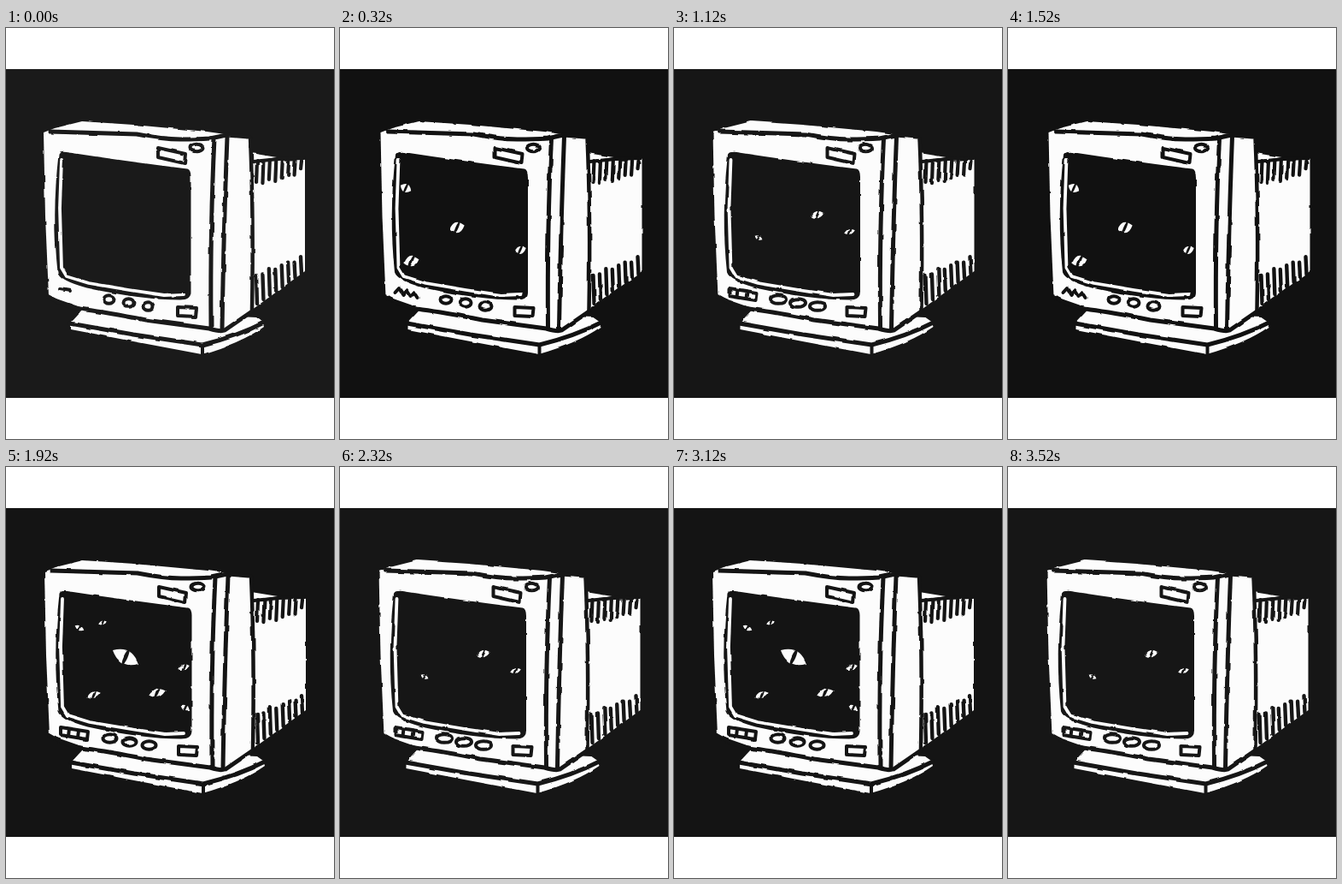
An HTML page that plays this animation: 384 by 480 pixels, repeating every 3560 ms.

```html
<!DOCTYPE html>
<html lang="en">
<head>
<meta charset="utf-8">
<title>Watching monitor</title>
<style>
  html, body { margin: 0; width: 100%; height: 100%; overflow: hidden; background: #fff; }
  svg { display: block; width: 384px; height: 480px; }
</style>
</head>
<body>
<svg id="stage" viewBox="0 0 384 480" stroke-linecap="round" stroke-linejoin="round"></svg>
<script>
const LOOP = 3560, STEP = 100, CYCLE = 12, HOLD = 4, LAG = 10;
const PAPER = '#fcfcfc';
const stage = document.getElementById('stage');

// Eyes are x, y, half length; a negative length tilts the eye the other way.
const drawings = [
  { ink: '#1a1a1a', shift: -1, knob: 6, badge: dash, roundness: 0, eyes: [] },
  { ink: '#111', shift: 2.5, knob: 6.5, badge: zigzag, roundness: .7,
    eyes: [[77, 187, -7], [137, 233, 9], [211, 259, 7], [84, 272, 9]] },
  { ink: '#141414', shift: 0, knob: 8, badge: grid, roundness: .46,
    eyes: [[86, 188, -6], [113, 182, 5], [140, 222, -17], [208, 234, 7],
           [103, 266, 8], [177, 264, 10], [210, 282, -6]] },
  { ink: '#161616', shift: .5, knob: 9, badge: grid, roundness: .5,
    eyes: [[99, 245, -5], [168, 218, 8], [206, 238, 6]] }
];

let ink;
const mix = (a, b, t) => a + (b - a) * t;
const range = (n, make) => Array.from({ length: n }, (_, i) => make(i, i / (n - 1)));
const fill = (points, color = PAPER) => `<polygon points="${points}" fill="${color}"/>`;
const line = (points, width = 5, color = ink) =>
  `<polyline points="${points}" fill="none" stroke="${color}" stroke-width="${width}"/>`;
const curve = (path, width = 5) => `<path d="${path}" fill="none" stroke="${ink}" stroke-width="${width}"/>`;
const box = (x, y, w, h, drop) =>
  `<path d="M${x} ${y}l${w} ${drop}l-1 ${h}l${1 - w} ${-drop}z" fill="${PAPER}" stroke="${ink}" stroke-width="4"/>`;
const ring = (x, y, rx, ry) =>
  `<ellipse cx="${x}" cy="${y}" rx="${rx}" ry="${ry}" fill="${PAPER}" stroke="${ink}" stroke-width="4"/>`;

function dash() { return line('64,305 76,307', 4); }

function zigzag() {
  return line(range(7, i => [62 + i * 4.5, 306 + i + (i % 2 ? -3 : 3)]).join(' '), 4);
}

function grid() {
  return box(64, 304, 32, 9, 5) + range(2, i => line([74 + i * 11, 306 + i * 2, 73 + i * 11, 314 + i * 2], 4)).join('');
}

function housing() {
  const teeth = range(8, (i, u) => {
    const x = mix(295, 347, u), sway = Math.sin(i * 2.4) * 2;
    const heel = mix(322, 287, u);
    return line([x, 155, x - 1, mix(180, 166, u * u) + sway], 4.2) +
      line([x - 1, mix(289, 269, u) + sway, x, heel], 4.4);
  });
  return fill('287,146 318,151 289,156') +
    fill('289,157 322,153 351,152 351,284 289,329') +
    line('290,156 320,153 350,152', 4) + teeth.join('');
}

function base() {
  return `<path d="M91 329L77 344V352L150 366L230 381Q276 368 303 349L301 343L294 338Z" fill="${PAPER}"/>` +
    curve('M76 345L150 358L231 370Q272 360 303 344') + curve('M231 370V381', 4);
}

function cabinet() {
  return fill('45,122 58,117 90,109 150,113 236,121 286,128 290,240 289,330 255,353 164,340 94,328 51,313 47,220') +
    curve('M51 314Q70 326 94 329T164 341L239 351Q252 355 257 353L289 331') +
    curve('M53 121L154 124Q185 130 205 130T240 129Q250 127 259 125L284 127') +
    curve('M245 129Q240 230 241 350') +
    curve('M260 127Q256 230 254 352') +
    curve('M287 128Q291 220 289 330', 4.5);
}

function glass() {
  const shape = 'M64 148Q66 145 75 147Q140 157 213 166Q216 167 216 174V308Q216 316 205 316' +
    'Q160 316 96 302Q66 294 63 285Q56 220 64 148Z';
  return `<path d="${shape}" fill="${ink}" stroke="${ink}" stroke-width="3"/>` +
    line('66,154 64,210 66,280 72,290 98,298 146,306 186,312 209,311', 3.8, PAPER);
}

function controls({ knob, badge }) {
  const knobs = range(3, i => ring(121.5 + i * 23, 317 + i * 4, knob, 4.8));
  return box(179, 140, 32, 11, 7) + ring(224, 140, 7.5, 4.3) +
    box(202, 326, 22, 10, 1) + knobs.join('') + badge();
}

function eye(x, y, size, roundness, lids) {
  const w = Math.abs(size), h = w * roundness * lids;
  return `<g transform="translate(${x} ${y})">
    <path d="M${-w} 0Q0 ${-2 * h} ${w} 0Q0 ${2 * h} ${-w} 0Z" transform="rotate(${size < 0 ? 28 : -16})" fill="${PAPER}"/>
    <ellipse rx="${w * .1 + .7}" ry="${h + 2}" transform="rotate(24)" fill="${ink}"/></g>`;
}

function draw(step) {
  const pose = Math.floor((step + 2) / HOLD);
  const drawing = drawings[pose];
  const lids = 1 - .2 * Math.abs(step + 1 - pose * HOLD);
  const eyes = drawing.eyes.map(e => eye(...e, drawing.roundness, lids));
  ink = drawing.ink;
  // A seeded displacement gives the outlines their uneven marker edge.
  stage.innerHTML = `<filter id="marker" filterUnits="userSpaceOnUse" x="0" y="48" width="384" height="384"
      color-interpolation-filters="sRGB">
      <feTurbulence type="fractalNoise" baseFrequency=".06" numOctaves="2" seed="${step + 1}"/>
      <feDisplacementMap in="SourceGraphic" scale="3" xChannelSelector="R" yChannelSelector="G"/>
    </filter>
    <rect width="384" height="480" fill="#fff"/>
    <rect y="48" width="384" height="384" fill="${ink}"/>
    <g filter="url(#marker)"><g transform="translate(${drawing.shift})">
    ${housing()}${base()}${cabinet()}${glass()}${controls(drawing)}</g>${eyes.join('')}</g>`;
}

let shown = -1;
const start = performance.now();

function tick(now) {
  const time = Math.max(0, now - start) % LOOP;
  const step = Math.max(0, Math.floor((time - LAG) / STEP)) % CYCLE;
  if (step !== shown) draw(shown = step);
  requestAnimationFrame(tick);
}
tick(start);
</script>
</body>
</html>
```
